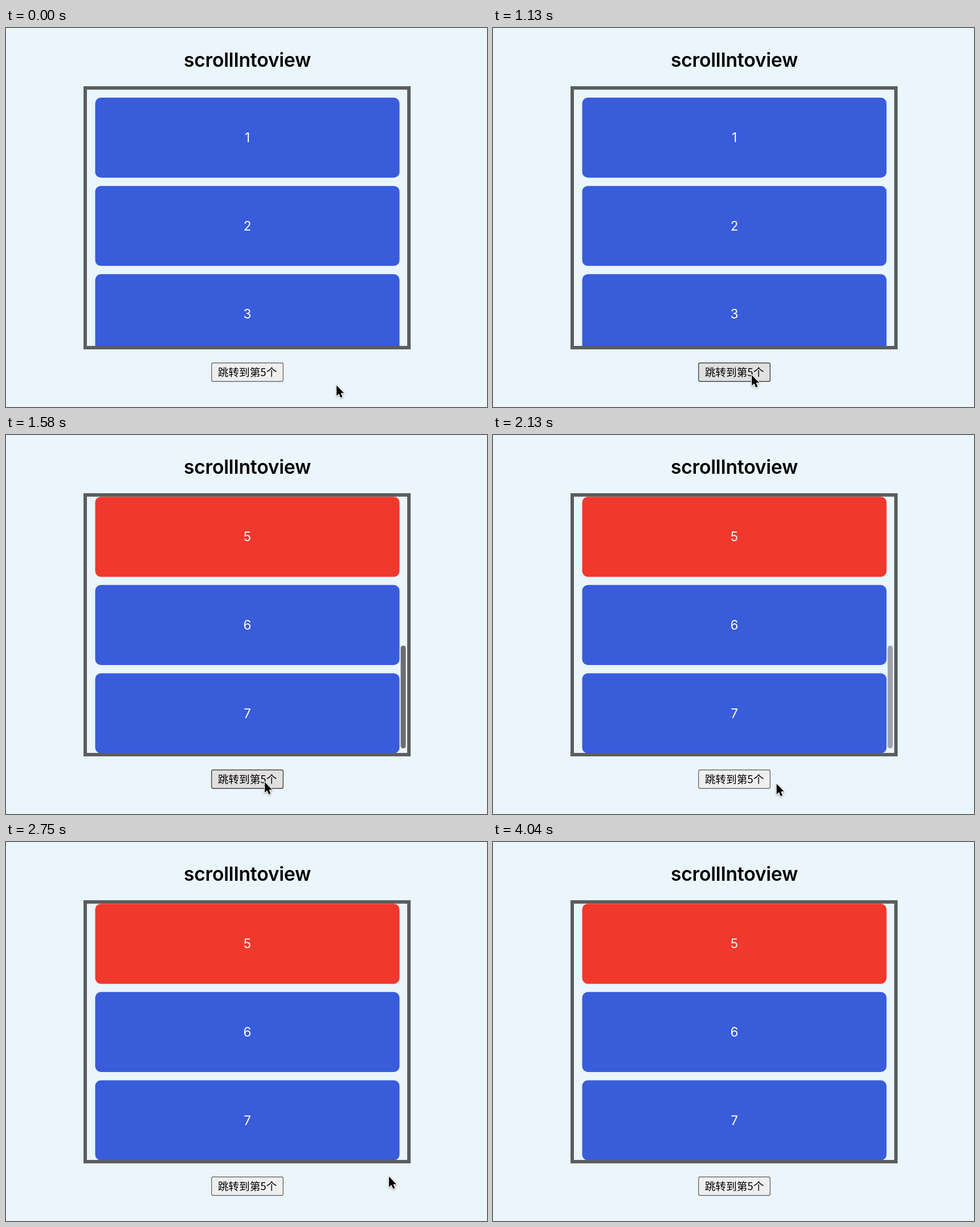
These frames come from a looping animation (844x664 px, 4080 ms). An HTML page:

```html
<!DOCTYPE html>
<html lang="zh">
<head>
<meta charset="utf-8">
<style>
  html, body { margin: 0; width: 100%; height: 100%; overflow: hidden; background: #eaf5fc; }
  svg { display: block; width: 844px; height: 664px; }
  text { text-anchor: middle; font-family: Inter, 'Noto Sans CJK SC', 'Noto Sans CJK', sans-serif; }
  #title { font-size: 33.6px; font-weight: 600; letter-spacing: -.2px; }
  #list text { font-size: 22.4px; fill: #fff; }
  #label { font-size: 18.67px; font-family: 'Noto Sans CJK SC', 'Noto Sans CJK', sans-serif; }
  #cursor { filter: drop-shadow(0 1.5px 1.5px rgba(0, 0, 0, .35)); }
</style>
</head>
<body>
<svg viewBox="0 0 844 664">
  <clipPath id="view"><rect x="142" y="108" width="563" height="450"/></clipPath>
  <text id="title" x="423.5" y="68">scrollIntoview</text>
  <g clip-path="url(#view)"><g id="list"></g></g>
  <rect id="bar" x="692.5" y="369" width="9" height="180" rx="4.5" fill="#6b6d70"/>
  <rect x="139" y="105" width="568" height="455" fill="none" stroke="#5b5d5e" stroke-width="6"/>
  <rect id="button" x="360.7" y="586.7" width="125.6" height="32.6" rx="3" stroke-width="1.4"/>
  <text id="label" x="423.5" y="610">跳转到第5个</text>
  <path id="cursor" d="M0 0V18.5L4.2 14.7L7.2 21.6L10.4 20.2L7.4 13.5H13Z"
        stroke="#fff" stroke-width="2.4" stroke-linejoin="round" paint-order="stroke"/>
</svg>
<script>
const LOOP = 4080, PRESS = 1450, CLICK = 1580, GONE = 3040;
const STEP = 154.67, SCROLL = 632.5;
const $ = id => document.getElementById(id);

$('list').innerHTML = [1, 2, 3, 4, 5, 6, 7].map(n => {
  const y = 122 + (n - 1) * STEP;
  return `<rect x="156.5" y="${y}" width="534" height="140.2" rx="10" fill="${n === 5 ? '#f1382d' : '#395cdb'}"/>
    <text x="423.5" y="${y + 78}">${n}</text>`;
}).join('');

const clamp = v => Math.min(1, Math.max(0, v));
const easeIn = p => p ** 1.5, easeOut = p => 1 - (1 - p) ** 2, linear = p => p;

// Pointer stops: time, x, y, easing towards the stop
const path = [
  [40, 580, 626, linear],
  [540, 510, 611, easeIn],
  [710, 476, 609, linear],
  [1080, 454, 608, easeOut],
  [2000, 454, 608, linear],
  [2250, 569, 616, easeIn],
  [2420, 672, 586, easeOut],
  [2750, 672, 586, linear],
  [GONE, 816, 462, easeIn],
];

function pointer(t) {
  const i = path.findIndex(stop => t < stop[0]);
  if (i < 1) return path.at(i).slice(1, 3);
  const [t0, x0, y0] = path[i - 1], [t1, x1, y1, ease] = path[i];
  const p = ease((t - t0) / (t1 - t0));
  return [x0 + (x1 - x0) * p, y0 + (y1 - y0) * p];
}

function set(id, attrs) {
  for (const name in attrs) $(id).setAttribute(name, attrs[name]);
}

function draw(t) {
  const [x, y] = pointer(t);
  const hover = x > 360 && x < 486 && y > 586 && y < 620;
  const [fill, stroke] = t >= PRESS && t < CLICK ? ['#f5f5f5', '#858585']
    : hover ? ['#e0e0e0', '#474747'] : ['#efefef', '#707070'];
  set('button', { fill, stroke });
  set('list', { transform: `translate(0 ${t < CLICK ? 0 : -SCROLL})` });
  set('bar', { opacity: t < CLICK ? 0 : 1 - clamp((t - 2030) / 245) });
  set('cursor', { transform: `translate(${x} ${y})`, opacity: t < GONE ? 1 : 0 });
}

function tick() {
  draw(performance.now() % LOOP);
  requestAnimationFrame(tick);
}
tick();
</script>
</body>
</html>
```
